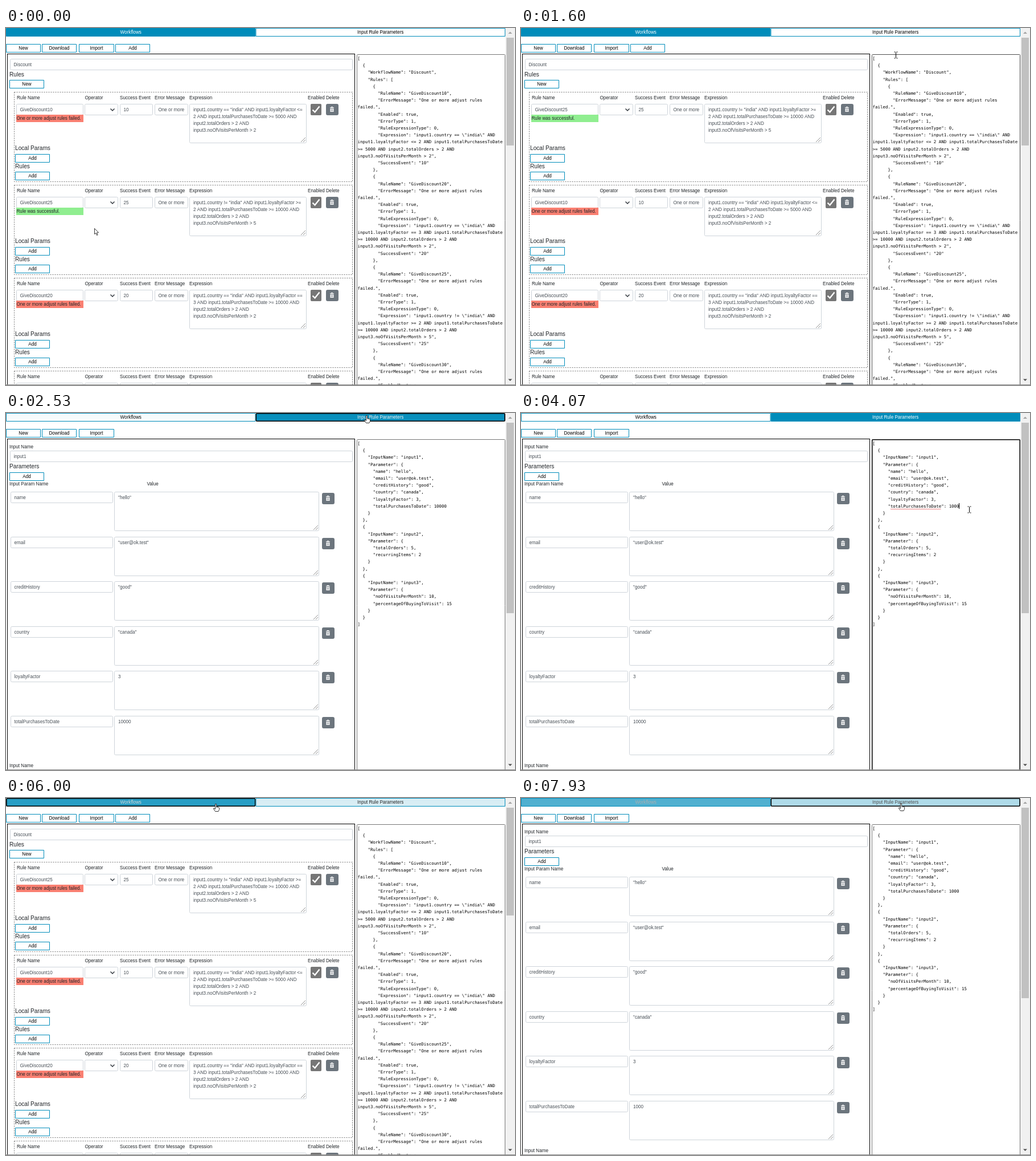
An HTML page with a canvas that plays this animation: 894x626 px, repeating every 8 s.

```html
<!DOCTYPE html>
<html lang="en">
<head>
<meta charset="utf-8">
<title>Rules editor</title>
<style>
html, body { margin: 0; width: 100%; height: 100%; overflow: hidden; background: #fff; }
canvas { display: block; }
</style>
</head>
<body>
<canvas id="stage" width="894" height="626"></canvas>
<script>
const g = document.getElementById('stage').getContext('2d');
const LOOP = 8000, FPS = 15;
const BLUE = '#008cba', INK = '#212529', FIELD = '#495057', LINE = '#ced4da', GREY = '#6c757d';
const SANS = '"Liberation Sans", Arial, sans-serif';
const BODY = '8.15px ' + SANS, HEAD = '10.15px ' + SANS;
const MONO = '7.43px "DejaVu Sans Mono", monospace', CHAR = 4.474, ROW = 12.2;

// Times in ms
const DRAG = 100, DROP = 720, TO_INPUTS = 2230, FOCUS_JSON = 3660, ERASE = 4060,
  SPELL = 4600, BLUR = 5725, TO_RULES = 5780, PRESS = 7725, BACK = 7850;

// Pointer stops: time, x, y
const PATH = [
  [0, 155, 351], [80, 155, 351], [350, 149, 290], [700, 149, 190], [870, 162, 192], [1200, 162, 192],
  [1600, 658, 47], [1730, 634, 4], [1930, 634, 4], [2000, 633, 4], [2560, 633, 4],
  [3000, 745, 204], [3470, 787, 169], [4470, 787, 169], [5330, 368, 11], [5400, 368, 10],
  [6340, 368, 10], [6600, 278, 100], [6930, 713, 66], [7200, 680, 18], [7730, 667, 9], [8000, 667, 9]
];

const rule = (event, eq, cmp, level, amount, visits) => ({
  name: 'GiveDiscount' + event, event: '' + event,
  lines: [
    `input1.country ${eq} "india" AND input1.loyaltyFactor ${cmp}`,
    `${level} AND input1.totalPurchasesToDate >= ${amount} AND`,
    'input2.totalOrders > 2 AND',
    `input3.noOfVisitsPerMonth > ${visits}`
  ]
});
const r10 = rule(10, '==', '<=', 2, 5000, 2), r20 = rule(20, '==', '==', 3, 10000, 2),
  r25 = rule(25, '!=', '>=', 2, 10000, 5), r30 = rule(30, '==', '>=', 3, 10000, 2);

const wrap = data => JSON.stringify(data, null, 2).split('\n')
  .flatMap(s => s.match(/.{1,58}(?=\s|$)\s?/g));
const rulesJson = wrap([{
  WorkflowName: 'Discount',
  Rules: [r10, r20, r25, r30].map(r => ({
    RuleName: r.name, ErrorMessage: 'One or more adjust rules failed.', Enabled: true,
    ErrorType: 1, RuleExpressionType: 0, Expression: r.lines.join(' '), SuccessEvent: r.event
  }))
}]);
const customer = total => ({
  name: 'hello', email: 'user@ok.test', creditHistory: 'good', country: 'canada',
  loyaltyFactor: 3, totalPurchasesToDate: total
});
const inputsJson = total => wrap([
  { InputName: 'input1', Parameter: customer(total) },
  { InputName: 'input2', Parameter: { totalOrders: 5, recurringItems: 2 } },
  { InputName: 'input3', Parameter: { noOfVisitsPerMonth: 10, percentageOfBuyingToVisit: 15 } }
]);
const ALL_TYPOS = /InputName|creditHistory|canada|loyaltyFactor|totalPurchasesToDate|totalOrders|recurringItems|noOfVisitsPerMonth|percentageOfBuyingToVisit/g;

const mix = (a, b, p) => a + (b - a) * p;
const clamp = v => Math.max(0, Math.min(1, v));

// CSS "ease"
function ease(x) {
  if (x <= 0 || x >= 1) return clamp(x);
  const curve = (s, a, b) => 3 * s * (1 - s) ** 2 * a + 3 * s * s * (1 - s) * b + s ** 3;
  let lo = 0, hi = 1;
  for (let i = 0; i < 20; i++) {
    const m = (lo + hi) / 2;
    if (curve(m, .25, .25) < x) lo = m; else hi = m;
  }
  return curve(lo, .1, 1);
}

function pointerAt(t) {
  const i = Math.max(1, PATH.findIndex(k => k[0] >= t));
  const [a, b] = [PATH[i - 1], PATH[i]];
  let p = clamp((t - a[0]) / (b[0] - a[0]));
  p = p * p * (3 - 2 * p);
  return [Math.round(mix(a[1], b[1], p)), Math.round(mix(a[2], b[2], p))];
}

// y is the middle of the capitals
function text(s, x, y, color = INK, font = BODY, align = 'left') {
  g.font = font;
  g.fillStyle = color;
  g.textAlign = align;
  g.fillText(s, x, Math.round(y + parseFloat(font) * .35));
}

function rect(x, y, w, h, color) {
  g.fillStyle = color;
  g.fillRect(x, y, w, h);
}

function box(x, y, w, h, stroke, radius = 0, fill = '#fff', width = 1) {
  g.beginPath();
  g.roundRect(x + width / 2, y + width / 2, w - width, h - width, radius);
  g.fillStyle = fill;
  g.fill();
  g.strokeStyle = stroke;
  g.lineWidth = width;
  g.stroke();
}

function stroke(points, color, width = 1) {
  g.beginPath();
  points.forEach(([x, y]) => g.lineTo(x, y));
  g.strokeStyle = color;
  g.lineWidth = width;
  g.stroke();
}

function shape(points, fill, line) {
  g.beginPath();
  points.forEach(([x, y]) => g.lineTo(x, y));
  g.closePath();
  g.fillStyle = fill;
  g.fill();
  if (line) { g.strokeStyle = line; g.lineWidth = .9; g.stroke(); }
}

function button(label, x, y, w = 61) {
  box(x, y, w, 15, BLUE);
  text(label, x + w / 2, y + 7.5, '#000', BODY, 'center');
}

function field(s, x, y, w) {
  box(x, y, w, 20, LINE, 2);
  text(s, x + 6.5, y + 10, FIELD);
}

function area(lines, x, y, w) {
  box(x, y, w, 69, LINE, 2);
  lines.forEach((s, i) => text(s, x + 7, y + 10 + i * ROW, FIELD));
  const r = x + w - 2, b = y + 67;
  stroke([[r - 8, b], [r, b - 8]], '#777', .8);
  stroke([[r - 4, b], [r, b - 4]], '#777', .8);
}

function trash(x, y) {
  box(x, y, 22, 20, GREY, 2, GREY);
  rect(x + 7, y + 6, 7, 1, '#fff');
  rect(x + 9, y + 5, 3, 1, '#fff');
  rect(x + 7.5, y + 8, 6, 6, '#fff');
  for (const dx of [9, 11]) rect(x + dx, y + 9, .8, 4, GREY);
}

function ruleCard(r, y, ok) {
  g.setLineDash([2, 2]);
  g.strokeStyle = '#777';
  g.lineWidth = 1;
  g.strokeRect(14.5, y + .5, 594, 157);
  g.setLineDash([]);
  const labels = { 'Rule Name': 19, Operator: 138.5, 'Success Event': 200, 'Error Message': 261,
    Expression: 322, Enabled: 530, Delete: 562 };
  for (const k in labels) text(k, labels[k], y + 10);
  field(r.name, 18, y + 21, 118);
  field('', 138, y + 21, 59);
  stroke([[183.5, y + 29.5], [187, y + 33], [190.5, y + 29.5]], '#343a40', 1.5);
  field(r.event, 200, y + 21, 58);
  field('One or more', 261, y + 21, 59);
  area(r.lines, 322, y + 21, 206);
  box(535, y + 21, 19, 20, '#767676', 1, '#767676');
  stroke([[538.5, y + 31.5], [542.5, y + 35.5], [550.5, y + 25.5]], '#fff', 2.4);
  trash(562, y + 21);
  rect(18, y + 40, 118, 13, ok ? '#90ee90' : '#fa8072');
  text(ok ? 'Rule was successful.' : 'One or more adjust rules failed.', 18.5, y + 46);
  text('Local Params', 16, y + 98, INK, HEAD);
  button('Add', 16, y + 109);
  text('Rules', 16, y + 130, INK, HEAD);
  button('Add', 16, y + 140);
}

function rulesPage(t) {
  field('Discount', 7, 54, 602);
  text('Rules', 6, 81, INK, HEAD);
  button('New', 6, 91);
  const ok = t < TO_INPUTS;
  const order = t < DROP ? [r10, r25, r20, r30] : [r25, r10, r20, r30];
  order.forEach((r, i) => ruleCard(r, 112 + i * 163, r === r25 && ok));
  if (t > DRAG && t < DROP) {
    const [px, py] = pointerAt(t);
    g.save();
    g.globalAlpha = .35;
    g.translate(px - 155, py - 351);
    ruleCard(r25, 275, ok);
    g.restore();
  }
}

function inputsPage(total) {
  text('Input Name', 6, 59);
  field('input1', 7, 66, 602);
  text('Parameters', 6, 93, INK, HEAD);
  button('Add', 6, 104);
  text('Input Param Name', 6, 124.5);
  text('Value', 247.5, 124.5);
  Object.entries(customer(total)).forEach(([k, v], i) => {
    const y = Math.round(138 + i * 78.6);
    field(k, 8, y, 180);
    area([JSON.stringify(v)], 190, y, 360);
    trash(555, y + 2);
  });
  text('Input Name', 6, 618);
}

function jsonPane(lines, t, hover) {
  const focus = t >= FOCUS_JSON && t < BLUR;
  box(616, 46, 261, 600, focus ? '#000' : hover ? '#4f4f4f' : '#767676', 1, '#fff', focus ? 1.5 : 1);
  const typos = t < FOCUS_JSON || t >= TO_RULES ? null : t < SPELL ? /totalPurchasesToDate/g : ALL_TYPOS;
  lines.slice(0, 48).forEach((s, i) => {
    const y = 53.3 + i * ROW;
    text(s, 617.6, y, '#000', MONO);
    if (!typos) return;
    for (const m of s.matchAll(typos)) {
      const wave = [];
      for (let d = 0; d <= m[0].length * CHAR; d += 1.5)
        wave.push([617.6 + m.index * CHAR + d, Math.round(y + 4.8) + (wave.length % 2 ? .9 : .1)]);
      stroke(wave, '#e04040', .7);
    }
  });
  if (focus && (t < 4190 || t >= 4700 && t < 5200))
    rect(t < ERASE ? 773 : 769, 158, 1, 10, '#000');
}

function tab(label, x, w, active, ring) {
  const fill = `rgb(${mix(255, 0, active)},${mix(255, 140, active)},${mix(255, 186, active)})`;
  const ink = 255 * active;
  if (ring) box(x, 0, w, 15, '#000', 1.5, fill, 1.6);
  else box(x, 0, w, 15, BLUE, 0, fill);
  text(label, x + w / 2, 7.3, `rgb(${ink},${ink},${ink})`, BODY, 'center');
}

function scrollbar(end) {
  rect(877, 0, 17, 626, '#f1f1f1');
  rect(879, 17, 13, end - 17, '#c1c1c1');
  shape([[882, 10], [885.5, 6.5], [889, 10]], '#a3a3a3');
  shape([[882, 615.5], [885.5, 619], [889, 615.5]], '#505050');
}

function pointer(x, y, overTab, overJson) {
  g.save();
  g.translate(x + .5, y + .5);
  if (overJson) {
    stroke([[0, -5], [0, 5]], '#000');
    for (const dy of [-5.5, 5.5]) {
      stroke([[-3, dy], [-1, dy]], '#000');
      stroke([[1, dy], [3, dy]], '#000');
    }
  } else if (overTab) {
    shape([[-1, 0], [1, 0], [1, 5], [4, 5.5], [6, 6.5], [6, 10], [4.5, 13], [-1, 13],
      [-4, 8.5], [-3.5, 7], [-1, 9]], '#fff', '#222');
    for (const dx of [1.2, 3.2]) stroke([[dx, 5], [dx, 7]], '#444', .6);
  } else {
    shape([[0, 0], [0, 10], [2.3, 8], [4, 12], [5.6, 11.3], [4, 7.5], [7, 7.2]], '#fff', '#222');
  }
  g.restore();
}

function draw(t) {
  rect(0, 0, 894, 626, '#fff');
  const inputs = t >= TO_INPUTS && t < TO_RULES || t >= BACK;
  const fade = start => ease((t - start) / 400);
  const active = t >= BACK ? fade(BACK) : t >= TO_RULES ? 1 - fade(TO_RULES) : fade(TO_INPUTS);
  const [x, y] = pointerAt(t);
  const overTab = y < 16, overJson = x >= 616 && x < 877 && y >= 46;

  tab('Workflows', 0, 438.5, 1 - active, t >= BLUR && t < PRESS);
  tab('Input Rule Parameters', 438.5, 438.5, active, t >= 2190 && t < FOCUS_JSON || t >= PRESS);
  button('New', 0, 28);
  button('Download', 63, 28);
  button('Import', 128, 28, 62);
  if (!inputs) button('Add', 192, 28);

  g.strokeStyle = '#000';
  g.lineWidth = 1;
  g.strokeRect(2.5, 45.5, 610, 600);
  if (inputs) inputsPage(t < BLUR ? 10000 : 1000);
  else rulesPage(t);
  jsonPane(inputs ? inputsJson(t < ERASE ? 10000 : 1000) : rulesJson, t, overJson);
  scrollbar(inputs ? 351 : 206);
  rect(0, 625, 894, 1, '#8a8a8a');
  pointer(x, y, overTab, overJson);
}

function tick(now) {
  // The screen refreshes 15 times a second
  draw(Math.floor((now % LOOP) * FPS / 1000 + .06) * 1000 / FPS);
  requestAnimationFrame(tick);
}
requestAnimationFrame(tick);
</script>
</body>
</html>
```
